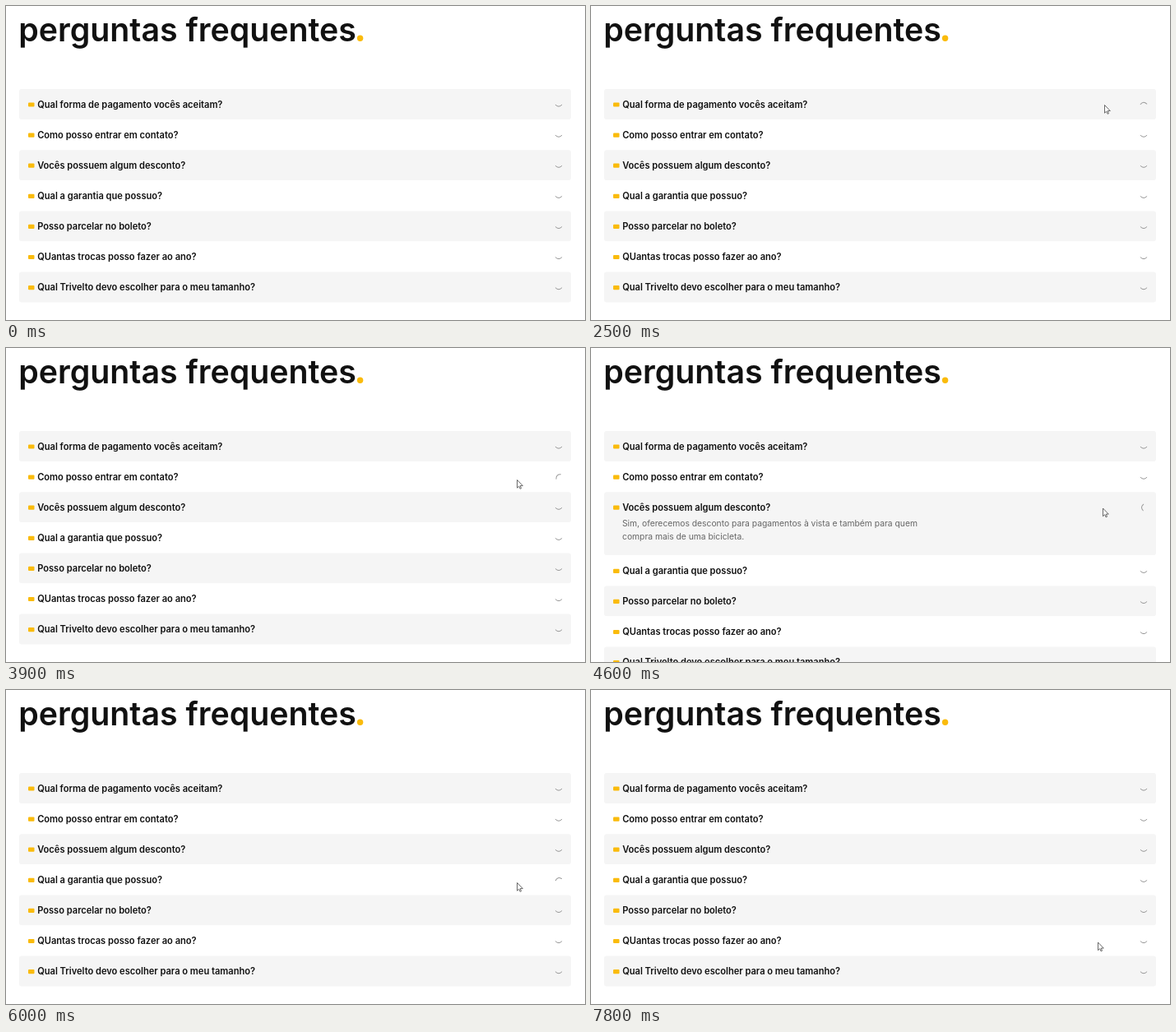
Write an HTML page that moves like this. It is 704 px wide and 382 px high and loops after 8000 ms.

```html
<!DOCTYPE html>
<html lang="pt-BR">
<head>
<meta charset="utf-8">
<title>Perguntas frequentes</title>
<style>
html, body { margin: 0; width: 100%; height: 100%; overflow: hidden; background: #fff; }
svg { display: block; width: 704px; height: 382px; }
text { font-family: Inter, "Open Sans", sans-serif; font-optical-sizing: none; fill: #111; }
.title { font-size: 39.3px; font-weight: 600; }
.question { font-size: 11.1px; font-weight: 600; }
.answer { font-size: 10.3px; fill: #666; }
.mark { fill: #fabb0c; }
.arrow { fill: none; stroke: #999; stroke-linecap: round; }
</style>
</head>
<body>
<svg id="stage" viewBox="0 0 704 382">
  <text class="title" x="15.2" y="42.8">perguntas frequentes</text>
  <circle class="mark" cx="430.6" cy="39.2" r="3.7"/>
  <g id="list"></g>
  <path id="cursor" d="M0 0V9.7L2.2 7.7L3.6 10.8L5 10.2L3.7 7.1H6.8Z" fill="#fff" stroke="#444" stroke-width=".8"/>
</svg>
<script>
const LOOP = 8000, STEP = 100, TOP = 101, PITCH = 37.1, ANSWER_HEIGHT = 40, TURN = 250;

// question, answer lines, opening time, closing time
const items = [
  ['Qual forma de pagamento vocês aceitam?',
    ['Aceitamos pagamentos parcelados em cartão de crédito. Para pagamentos à vista', 'também aceitamos transferência e boleto.'], 1960, 2495],
  ['Como posso entrar em contato?',
    ['Você pode entrar em contato pela nossa página de contato ou diretamente', 'em uma das nossas lojas.'], 3460, 3838],
  ['Vocês possuem algum desconto?',
    ['Sim, oferecemos desconto para pagamentos à vista e também para quem', 'compra mais de uma bicicleta.'], 4470, 4910],
  ['Qual a garantia que possuo?',
    ['Todas as bicicletas possuem garantia de dois anos contra defeitos', 'de fabricação.'], 5770, 5995],
  ['Posso parcelar no boleto?',
    ['Infelizmente o parcelamento está disponível apenas para pagamentos', 'feitos com cartão de crédito.'], 6860, 7260],
  ['QUantas trocas posso fazer ao ano?', []],
  ['Qual Trivelto devo escolher para o meu tamanho?', []]
];

// time, x, y of the pointer tip
const path = [
  [500, 632, 240], [1200, 624.8, 115], [1350, 624.8, 115], [1600, 624.5, 120.5],
  [2600, 624.5, 120.5], [3300, 621.5, 160.5], [3900, 621.5, 160.5], [4300, 622.5, 195],
  [5000, 622.5, 195], [5300, 621.5, 239], [5450, 621.5, 239], [5600, 621.5, 234.5],
  [6100, 621.5, 234.5], [6700, 621.2, 261.5], [7350, 621.2, 261.5], [7800, 616.5, 307]
];

const list = document.getElementById('list');
const cursor = document.getElementById('cursor');
const clamp = v => Math.max(0, Math.min(1, v));

const rows = items.map(([question, lines, open, close], i) => {
  const row = document.createElementNS('http://www.w3.org/2000/svg', 'g');
  row.innerHTML = `
    <rect class="back" x="16" width="671" height="36.9" rx="3" fill="${i % 2 ? '#fff' : '#f5f5f5'}"/>
    <rect class="mark" x="27" y="16.4" width="7.5" height="5.2" rx="1"/>
    <text class="question" x="38.2" y="22.8">${question}</text>
    <g class="details">${lines.map((line, n) =>
      `<text class="answer" x="38" y="${42 + n * 15.5}">${line}</text>`).join('')}</g>
    <path class="arrow" d="M-3.8 .5Q0 4.5 3.8 .5"/>`;
  list.append(row);
  const part = name => row.querySelector(name);
  return { row, open, close, back: part('.back'), details: part('.details'), arrow: part('.arrow') };
});

function pointer(t) {
  const next = path.findIndex(p => p[0] > t);
  if (next < 0) return path[path.length - 1].slice(1);
  const [t0, x0, y0] = path[next - 1], [t1, x1, y1] = path[next];
  const u = (t - t0) / (t1 - t0), k = u * u * (3 - 2 * u);
  return [x0 + (x1 - x0) * k, y0 + (y1 - y0) * k];
}

function draw(t) {
  let y = TOP;
  for (const { row, open, close, back, details, arrow } of rows) {
    const isOpen = t >= open && t < close;
    const extra = isOpen ? ANSWER_HEIGHT : 0;
    const turn = open ? clamp((t - open) / TURN) - clamp((t - close) / TURN) : 0;
    row.setAttribute('transform', `translate(0 ${y})`);
    back.setAttribute('height', 36.9 + extra);
    details.setAttribute('visibility', isOpen ? 'visible' : 'hidden');
    arrow.setAttribute('transform', `translate(672 18.8) rotate(${180 * turn})`);
    y += PITCH + extra;
  }
  const shown = t >= path[0][0];
  cursor.setAttribute('visibility', shown ? 'visible' : 'hidden');
  if (shown) cursor.setAttribute('transform', `translate(${pointer(t)})`);
}

function tick() {
  const t = performance.now() % LOOP;
  draw(Math.floor(t / STEP) * STEP);
  requestAnimationFrame(tick);
}
tick();
</script>
</body>
</html>
```
